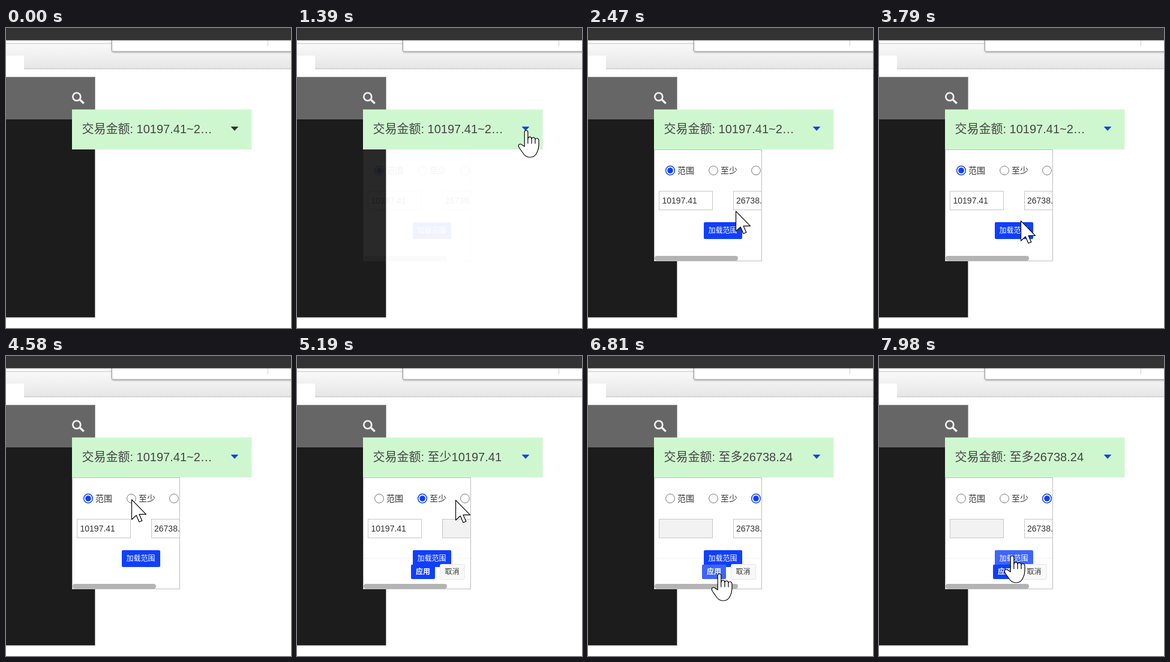
Recreate the animation shown at these times as an HTML page. Size 475 by 499 pixels, loop 8 s.

```html
<!DOCTYPE html>
<html lang="zh">
<head>
<meta charset="utf-8">
<title>Amount filter</title>
<style>
  html, body { margin: 0; width: 100%; height: 100%; overflow: hidden; background: #fff; }
  svg { display: block; width: 100vw; height: 100vh; }
  text { font-family: "Liberation Sans", "Noto Sans CJK SC", "Noto Sans CJK", sans-serif; white-space: pre; }
  .label { font-size: 14px; fill: #333; }
  .btn { font-size: 12px; fill: #fff; font-weight: 500; }
  .box { stroke: #c6c6c6; }
</style>
</head>
<body>
<svg viewBox="0 0 475 499" preserveAspectRatio="none">
  <defs>
    <linearGradient id="strip" x2="0" y2="1">
      <stop offset="0" stop-color="#fafafa"/><stop offset="1" stop-color="#e6e6e6"/>
    </linearGradient>
    <filter id="shade" x="-10%" y="-50%" width="120%" height="200%">
      <feDropShadow dx="0" dy="1" stdDeviation="1.5" flood-opacity=".35"/>
    </filter>
    <clipPath id="inside"><rect x="110" y="202" width="179" height="186"/></clipPath>
  </defs>

  <rect width="475" height="499" fill="#fff"/>
  <rect y="25" width="475" height="43" fill="url(#strip)"/>
  <rect y="25" width="177" height="1.5" fill="#d4d4d4"/>
  <rect y="67" width="475" height="1.5" fill="#cacaca"/>
  <rect y="46" width="30" height="23" fill="#fff"/>
  <path d="M176.5 15V36.500q0 2.500 2.500 2.500H480V15z" fill="#fff" stroke="#999" filter="url(#shade)"/>
  <rect x="436" y="20" width="1" height="10" fill="#ccc"/>
  <rect width="475" height="20.500" fill="#333"/>

  <rect x="-1" y="81.500" width="149.500" height="400" fill="#1c1c1c" stroke="#aaa"/>
  <rect y="82" width="148" height="70" fill="#666"/>
  <g fill="none" stroke="#eee">
    <circle cx="117.800" cy="114.300" r="6.500" stroke-width="2.800"/>
    <path d="M122.700 118.800L129.700 125.500" stroke-width="3.600"/>
  </g>

  <rect x="110" y="135.500" width="299.500" height="66.500" fill="#cff7cf"/>
  <text id="title" x="126.500" y="175" font-size="20" fill="#444"></text>
  <path id="caret" d="M374.500 164H387.500L381 171z"/>

  <g id="popup">
    <rect x="110.500" y="202.500" width="179" height="185" fill="#fff" stroke="#bdbdbd"/>
    <g clip-path="url(#inside)">
      <g id="radios"></g>
      <text class="label" x="149" y="242">范围</text>
      <text class="label" x="221" y="242">至少</text>
      <rect id="lowBox" class="box" x="118.500" y="271.500" width="89" height="31"/>
      <rect id="highBox" class="box" x="242.500" y="271.500" width="89" height="31"/>
      <text id="low" class="label" x="123.500" y="292">10197.41</text>
      <text id="high" class="label" x="247" y="292">26738.24</text>
      <rect id="load" x="193" y="323" width="64" height="28" rx="2"/>
      <text class="btn" x="200.500" y="341">加载范围</text>
      <g id="footer">
        <path d="M111 336.500H193M257 336.500H289" stroke="#f3f3f3"/>
        <rect id="apply" x="190" y="347" width="40" height="24" rx="2"/>
        <text class="btn" x="198" y="363" style="font-weight:700">应用</text>
        <rect x="238.500" y="346.500" width="41" height="25" rx="2" fill="#f8f8f8" stroke="#e6e6e6"/>
        <text class="btn" x="246.500" y="363" style="fill:#333;font-weight:400">取消</text>
      </g>
      <rect x="111" y="379" width="139" height="8" rx="4" fill="#b4b4b4"/>
    </g>
  </g>

  <g id="pointer" fill="#fff" stroke="#000" stroke-linejoin="round" stroke-linecap="round">
    <path id="arrow" stroke-width="1.200" d="M.5 .8V34L8.200 27L13 38L17.800 36L13 25.300H24.500z"/>
    <g id="hand" stroke-width="1.200">
      <path d="M-2.800 28V4Q-2.800 1.500 0 1.500T2.800 4V15Q3.500 12 6 12T9 15Q9.500 13 12 13T15 16Q15.500 14.500 18 14.500T21 18V26Q20.800 33 17.500 39Q14 46 6.500 46Q0 46-4 41L-11.500 30.500Q-14 26-11.500 24.500T-6 26z"/>
      <path fill="none" d="M2.800 15V23M9 15V23M15 16V23"/>
    </g>
  </g>
</svg>
<script>
const $ = id => document.getElementById(id);
const LOOP = 8000, START = 70, STEP = 77.5;
const BLUE = '#0f3fff', LIT = '#3d64ff';

// Pointer journey: each leg glides from the previous spot
const legs = [];
const glide = (from, to, x, y) => legs.push({ from, to, x, y });
glide(0, START, 414, 374);      // enter from below
glide(70, 303, 391, 168);
glide(535, 690, 382, 169);      // open the menu
glide(1650, 2085, 261, 266);
glide(2160, 2472, 246, 304);
glide(2550, 3015, 292, 299);
glide(3250, 3945, 220, 326);    // load button
glide(4255, 4565, 209, 238);    // second radio
glide(4720, 5185, 264, 239);
glide(5185, 5883, 278, 240);    // third radio
glide(5960, 6348, 219, 373);
glide(6580, 6812, 219, 361);    // apply button
glide(7510, 7975, 222, 331);    // load button again

const clamp = v => Math.min(1, Math.max(0, v));
const progress = (t, from, to) => clamp((t - from) / (to - from));

function pointAt(t) {
  return legs.reduce(([x, y], leg) => {
    const p = progress(t, leg.from, leg.to);
    return [x + (leg.x - x) * p, y + (leg.y - y) * p];
  }, [legs[0].x, legs[0].y]);
}

const radios = [137, 209, 280].map(x => {
  const add = (r, fill) => {
    const c = document.createElementNS('http://www.w3.org/2000/svg', 'circle');
    const attrs = { cx: x, cy: 237, r, fill };
    for (const k in attrs) c.setAttribute(k, attrs[k]);
    $('radios').append(c);
    return c;
  };
  return { ring: add(7.4, '#fff'), dot: add(4.8, BLUE) };
});

const set = (id, key, value) => $(id).setAttribute(key, value);
const show = (el, on) => { el.style.display = on ? '' : 'none'; };
const within = (x, y, l, t, r, b) => x >= l && x <= r && y >= t && y <= b;

function draw(time) {
  const t = START + Math.floor((time - START + 10) / STEP) * STEP;
  const [x, y] = pointAt(t);
  const mode = t < 4640 ? 0 : t < 5950 ? 1 : 2;
  const edited = mode > 0;

  $('title').textContent = '交易金额: ' + ['10197.41~2…', '至少10197.41', '至多26738.24'][mode];
  set('caret', 'fill', t < 920 ? '#333' : '#1b40ea');

  const alpha = progress(t, 1375, 1605);
  set('popup', 'opacity', alpha);
  radios.forEach(({ ring, dot }, i) => {
    const on = i === mode;
    ring.setAttribute('stroke', on ? BLUE : '#777');
    ring.setAttribute('stroke-width', on ? 1.5 : 1);
    show(dot, on);
  });
  set('lowBox', 'fill', mode === 2 ? '#f2f2f2' : '#fff');
  set('highBox', 'fill', mode === 1 ? '#f2f2f2' : '#fff');
  show($('low'), mode !== 2);
  show($('high'), mode !== 1);
  show($('footer'), edited);

  const onApply = edited && within(x, y, 190, 347, 230, 371);
  const onLoad = alpha === 1 && !onApply && within(x, y, 193, 323, 257, 351);
  set('apply', 'fill', onApply ? LIT : BLUE);
  set('load', 'fill', onLoad ? LIT : BLUE);

  const hand = onApply || onLoad || within(x, y, 362, 150, 400, 188);
  show($('pointer'), t >= START);
  show($('hand'), hand);
  show($('arrow'), !hand);
  set('pointer', 'transform', `translate(${Math.round(x)} ${Math.round(y)})`);
}

const begin = performance.now();
function tick(now) {
  draw(Math.max(0, now - begin) % LOOP);
  requestAnimationFrame(tick);
}
draw(0);
requestAnimationFrame(tick);
</script>
</body>
</html>
```
